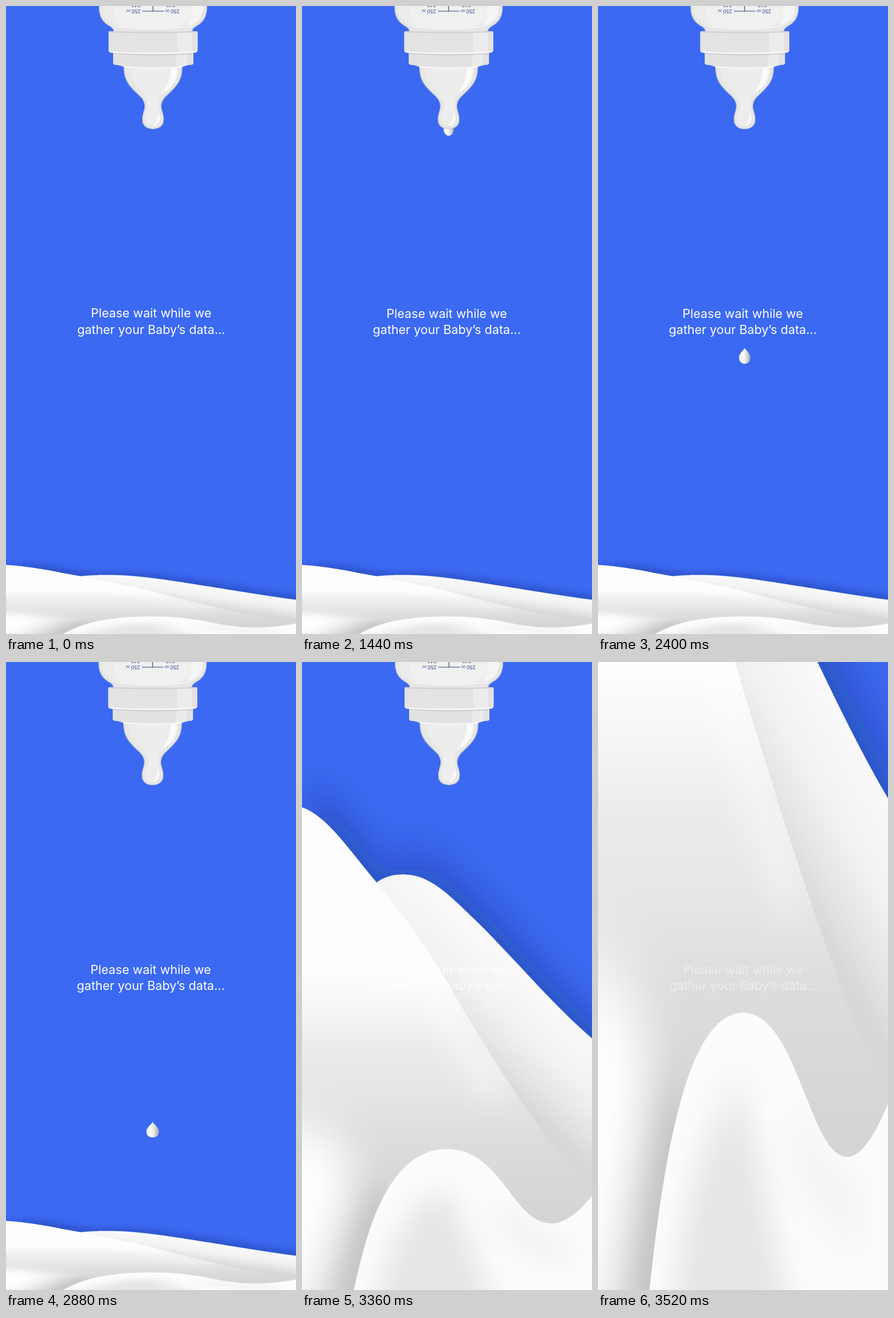
An HTML page for the animation above (3600 ms loop, 509 px wide and 1099 px high).

```html
<!DOCTYPE html>
<html lang="en">
<head>
<meta charset="utf-8">
<title>Loading</title>
<style>
  html, body { margin: 0; width: 100%; height: 100%; overflow: hidden; background: #3b69f2; }
  svg { display: block; width: 509px; height: 1099px; }
  .msg { font: 400 21.6px Inter, sans-serif; fill: #fff; text-anchor: middle; }
  .ml { font: 8.5px Inter, sans-serif; fill: #2f4486; }
  .unit { font-size: 6px; }
</style>
</head>
<body>
<svg viewBox="0 0 509 1099">
  <defs>
    <filter id="shade" filterUnits="userSpaceOnUse" x="-120" y="0" width="900" height="1300">
      <feDropShadow dx="16" dy="-12" stdDeviation="24 46" flood-color="#101a50" flood-opacity=".36"/>
    </filter>
    <filter id="soft" filterUnits="userSpaceOnUse" x="-150" y="250" width="800" height="1000">
      <feGaussianBlur stdDeviation="26"/>
    </filter>
    <filter id="softer" filterUnits="userSpaceOnUse" x="-250" y="250" width="900" height="1100">
      <feGaussianBlur stdDeviation="36 44"/>
    </filter>
    <linearGradient id="back" gradientUnits="userSpaceOnUse" x1="400" y1="560" x2="281" y2="693">
      <stop offset="0" stop-color="#f9f9f9"/><stop offset=".42" stop-color="#f1f2f2"/>
      <stop offset=".68" stop-color="#e5e6e6"/><stop offset=".95" stop-color="#d7d8d8"/>
    </linearGradient>
    <linearGradient id="front" gradientUnits="userSpaceOnUse" x1="0" y1="257" x2="0" y2="990">
      <stop offset="0" stop-color="#fdfdfd"/><stop offset=".4" stop-color="#fdfdfd"/>
      <stop offset=".47" stop-color="#f6f6f6"/><stop offset=".56" stop-color="#ececec"/>
      <stop offset=".66" stop-color="#e7e7e7"/><stop offset=".78" stop-color="#dcdddd"/>
      <stop offset="1" stop-color="#d3d3d3"/>
    </linearGradient>
    <linearGradient id="pearl">
      <stop offset="0" stop-color="#ededed"/><stop offset=".4" stop-color="#fdfdfd"/>
      <stop offset=".65" stop-color="#e0e0e0"/><stop offset="1" stop-color="#a2a4a6"/>
    </linearGradient>
    <path id="frontShape" d="M0 257C45 272 85 335 131 388C170 435 220 500 260 571C310 654 350 720 400 792C440 850 465 890 509 923V1120H0Z"/>
    <path id="bumpShape" d="M89 1108C112 1000 150 853 255 853C330 853 360 935 400 968C440 1000 475 976 509 935V1120H89Z"/>
    <clipPath id="frontClip"><use href="#frontShape"/></clipPath>
    <clipPath id="bumpClip"><use href="#bumpShape"/></clipPath>
  </defs>

  <rect width="509" height="1099" fill="#3b69f2"/>
  <path id="drop" fill="url(#pearl)"/>

  <g id="bottle">
    <path d="M164-6C162 20 172 29 181 34Q190 39 190 45H326Q326 39 335 34C344 29 354 20 352-6Z" fill="#e6e6e6" stroke="#d3d5d6" stroke-width="1.6"/>
    <path d="M169-6C168 20 180 30 194 37Q225 42 258 42T322 37C336 30 348 20 347-6Z" fill="#ececec"/>
    <path d="M189-6C189 20 192 32 204 38Q258 43 300 39C318 33 325 20 325-6Z" fill="#f0f0f0"/>
    <path d="M325-6H347C348 18 337 30 318 36C325 24 326 10 325-6Z" fill="#f5f5f5"/>
    <path d="M258-5V9M239 9H277" fill="none" stroke="#2f4486" stroke-width="1.2"/>
    <g class="ml">
      <text transform="translate(236 5.6) rotate(180)">250 <tspan class="unit">ml</tspan></text>
      <text transform="translate(304.5 5.6) rotate(180)">250 <tspan class="unit">ml</tspan></text>
      <text transform="translate(236 -5) rotate(180)">240</text>
      <text transform="translate(297 -5) rotate(180)">240</text>
    </g>
    <path d="M207.500 104C206 136 225 146 238 160C246 170 245 178 242 186C236 205 243 214.500 258 214.500C273 214.500 280 205 274 186C271 178 270 170 278 160C291 146 310 136 308.500 104Z" fill="#e7e7e7" stroke="#d2d4d2" stroke-width="1.8"/>
    <path d="M216 108C217 132 238 145 247 161C252 172 248 182 246 190C243 205 250 209 258 209C267 209 271 202 270 190C266 180 266 170 270 160C284 146 301 132 302 108Z" fill="#ededed"/>
    <path d="M290 109H301C301 130 290 145 274 153C284 140 289 128 290 109Z" fill="#fbfbfb"/>
    <path d="M267 181C273 196 269 209 257 210C266 203 268 193 267 181Z" fill="#fbfbfb"/>
    <path d="M188 80H329V99Q329 103 325 103Q317 103 309 107Q258 111 207 107Q199 103 192 103Q188 103 188 99Z" fill="#e2e2e2"/>
    <path d="M299 82H318V104L299 108Z" fill="#ebebeb"/>
    <path d="M207 106.500Q258 110.500 309 106.500" fill="none" stroke="#fafafa" stroke-width="2"/>
    <path d="M188 83Q258 88 329 83" fill="none" stroke="#d0d0d0" stroke-width="2"/>
    <path d="M182 44H334Q336.500 44 336.500 47V78Q336.500 80 334 80.500Q258 86 182 80.500Q180 80 180 78V47Q180 44 182 44Z" fill="#e3e3e3"/>
    <path d="M301 45H327V81L301 83Z" fill="#ececec"/>
    <path d="M181 45Q258 48 335.500 45" fill="none" stroke="#cfcfcf" stroke-width="2"/>
    <path d="M182 80.500Q258 85 334 80.500" fill="none" stroke="#fbfbfb" stroke-width="2.200"/>
  </g>

  <g id="milk">
    <path d="M0 257C45 272 85 335 131 388C145 378 160 374 178 374C228 374 262 414 320 469C390 540 440 600 509 660L640 790V1120H0Z" fill="url(#back)" filter="url(#shade)"/>
    <use href="#frontShape" fill="url(#front)"/>
    <g clip-path="url(#frontClip)">
      <path d="M190 520C250 610 290 670 345 760" fill="none" stroke="#fff" stroke-width="50" opacity=".5" filter="url(#soft)"/>
      <path d="M78 1140C90 1060 110 1000 140 930" fill="none" stroke="#b4b4b4" stroke-width="56" opacity=".7" filter="url(#soft)"/>
      <path d="M-140 790C20 790 95 840 90 900C80 970 45 1040 5 1180H-140Z" fill="#fff" filter="url(#softer)"/>
    </g>
    <use href="#bumpShape" fill="#fcfcfc"/>
    <g clip-path="url(#bumpClip)">
      <path d="M125 1150C145 1020 185 950 250 920C275 950 300 1030 345 1150Z" fill="#e5e5e5" filter="url(#soft)"/>
      <path d="M345 960Q430 1050 470 1030" fill="none" stroke="#eaeceb" stroke-width="30" filter="url(#soft)"/>
    </g>
  </g>

  <g id="msg" class="msg">
    <text x="254.800" y="545">Please wait while we</text>
    <text x="254.800" y="573.500">gather your Baby’s data...</text>
  </g>
</svg>
<script>
const LOOP = 3600, STEP = 80, FLOOR = 1106.4;
const $ = id => document.getElementById(id);
const drop = $('drop'), bottle = $('bottle'), milk = $('milk'), msg = $('msg');

// [time, value] tables
const fall = [[1180, 182], [1440, 199], [1920, 392], [2880, 805], [3280, 985]];
const plump = [[1440, 0], [1920, 0], [2880, 1]];
const fade = [[3200, 1], [3280, .9], [3360, .72], [3520, .42]];

function at(keys, t) {
  if (t <= keys[0][0]) return keys[0][1];
  for (let i = 1; i < keys.length; i++) {
    const [t0, a] = keys[i - 1], [t1, b] = keys[i];
    if (t < t1) return a + (b - a) * (t - t0) / (t1 - t0);
  }
  return keys[keys.length - 1][1];
}

// cubic-bezier(.42, 0, .58, 1)
function easeInOut(x) {
  if (x <= 0) return 0;
  if (x >= 1) return 1;
  let lo = 0, hi = 1, s;
  for (let i = 0; i < 24; i++) {
    s = (lo + hi) / 2;
    const bx = 3 * .42 * (1 - s) ** 2 * s + 3 * .58 * (1 - s) * s * s + s ** 3;
    if (bx < x) lo = s; else hi = s;
  }
  return s * s * (3 - 2 * s);
}

function dropPath(m) {
  const w = 9 + 2 * m, h = 28 - m, b = 5 + 2 * m;
  return `M0 0C2 4 ${w} 9 ${w} 17C${w} 23 ${b} ${h} 0 ${h}C${-b} ${h} ${-w} 23 ${-w} 17C${-w} 9 -2 4 0 0Z`;
}

function draw(t) {
  const dx = t >= 80 && t < 3200 ? -.7 : 0;
  const grow = .151 + 1.86 * easeInOut((t - 3165) / 410);
  bottle.setAttribute('transform', `translate(${dx} 0)`);
  msg.setAttribute('transform', `translate(${dx} ${t >= 80 ? .5 : 0})`);
  msg.setAttribute('opacity', at(fade, t));
  milk.setAttribute('transform', `matrix(1 0 0 ${grow} 0 ${FLOOR * (1 - grow)})`);
  drop.setAttribute('d', dropPath(at(plump, t)));
  drop.setAttribute('transform', `translate(${258.2 + dx} ${at(fall, t)})`);
  drop.setAttribute('visibility', t > 1180 && t < 3280 ? 'visible' : 'hidden');
}

const start = performance.now();
function tick() {
  const t = (performance.now() - start) % LOOP;
  draw(Math.floor(t / STEP) * STEP);
  requestAnimationFrame(tick);
}
draw(0);
requestAnimationFrame(tick);
</script>
</body>
</html>
```
